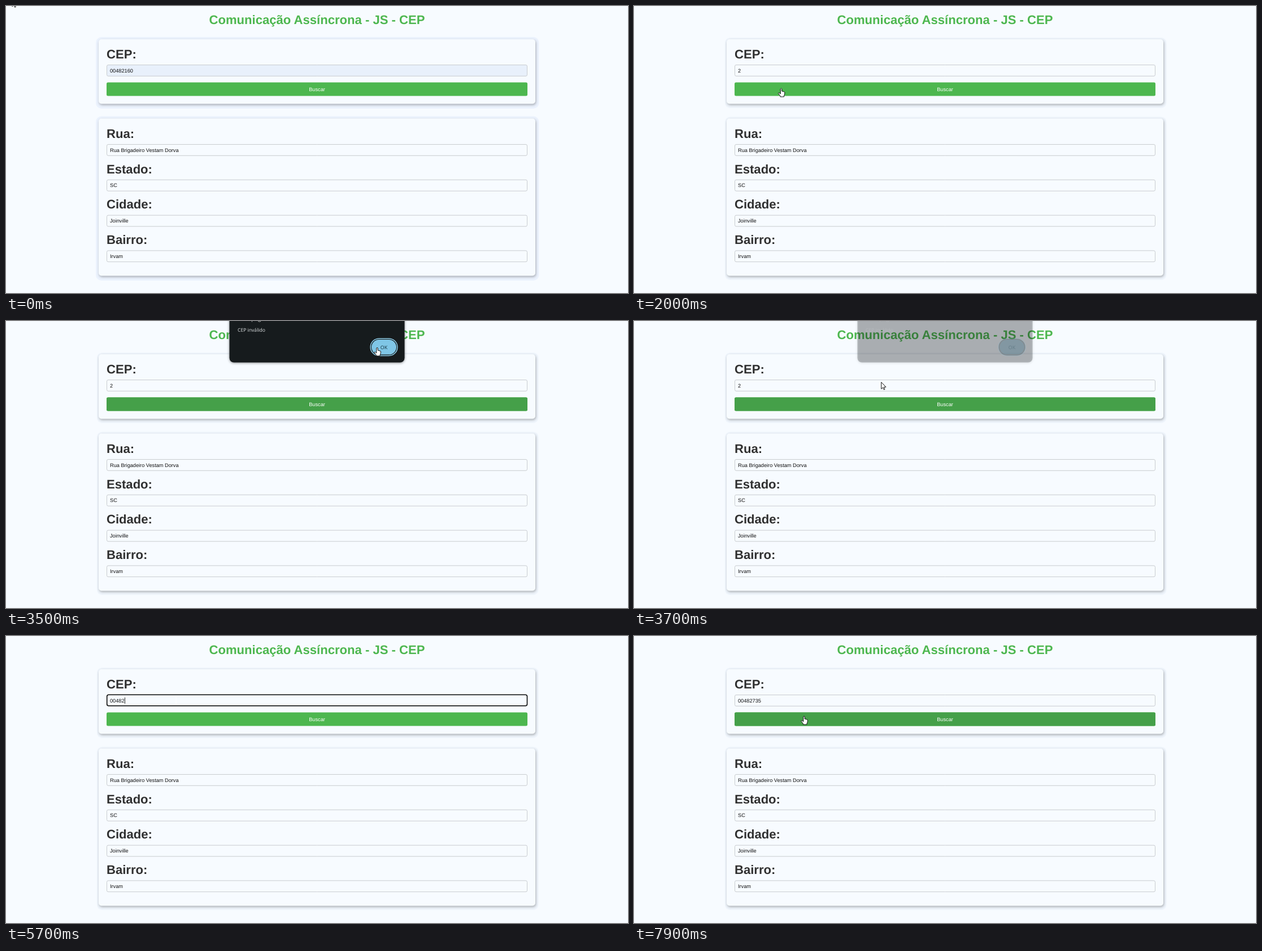
An HTML page with a canvas for the animation above (8000 ms loop, 1101 by 509 pixels).

```html
<!DOCTYPE html>
<html lang="pt-BR">
<head>
<meta charset="utf-8">
<title>CEP</title>
<style>
html, body { margin: 0; width: 100%; height: 100%; overflow: hidden; background: #f7fbff; }
canvas { display: block; }
</style>
</head>
<body>
<canvas id="stage" width="1101" height="509"></canvas>
<script>
const ctx = document.getElementById('stage').getContext('2d');
ctx.textRendering = 'geometricPrecision';

const LOOP = 8000, STEP = 50;
const PAGE = '#f7fbff', GREEN = '#4db74f', DARK_GREEN = '#45a049';
const ARIAL = '"Liberation Sans", Arial, sans-serif';
const UI = '"Open Sans", sans-serif';
const HEADING = `bold 22.08px ${ARIAL}`, SMALL = `9.2px ${ARIAL}`;
const OLD_CODE = '00482160', NEW_CODE = '00482735';
const ADDRESS = [
  ['Rua:', 'Rua Brigadeiro Vestam Dorva'],
  ['Estado:', 'SC'],
  ['Cidade:', 'Joinville'],
  ['Bairro:', 'Irvam'],
];

// Pointer stops: time, x, y
const STOPS = [
  [0, 11, -11], [500, 258.5, 109.5], [1700, 258.5, 109.5], [1950, 260.5, 146],
  [2300, 260.5, 146], [2500, 241, 122], [2650, 241, 122], [3500, 657, 47],
  [3600, 657, 47], [3750, 361, 130], [3850, 361, 130], [4150, 303, 127],
  [4200, 301, 114], [7350, 301, 114], [7600, 301, 142], [LOOP, 301, 142],
];
const ARROW = new Path2D('M0 0V12L2.8 9.4 4.6 13.4 6.3 12.6 4.6 8.7H8.3Z');
const HAND = new Path2D('M-1.2 1Q0-.8 1.2 1V5L5 6Q6.6 6.4 6.4 8L5.9 11.3 5 13V15H-1.6V13.4L-4.8 9.5Q-5.4 7.8-3.8 7.8L-1.2 9.8Z');

const clamp = v => Math.max(0, Math.min(1, v));
const within = (t, a, b) => t >= a && t < b;

function text(str, x, y, font, color, align = 'left') {
  ctx.font = font;
  ctx.fillStyle = color;
  ctx.textAlign = align;
  ctx.fillText(str, x, y);
}

function box(x, y, w, h, r, fill, stroke, line = 1) {
  ctx.beginPath();
  ctx.roundRect(x, y, w, h, r);
  if (fill) { ctx.fillStyle = fill; ctx.fill(); }
  if (stroke) { ctx.strokeStyle = stroke; ctx.lineWidth = line; ctx.stroke(); }
}

function shadow(color, blur, dx = 0, dy = 0) {
  ctx.shadowColor = color;
  ctx.shadowBlur = blur;
  ctx.shadowOffsetX = dx;
  ctx.shadowOffsetY = dy;
}

function card(y, h, strong) {
  if (strong) box(159, y - 4, 784.5, h + 12.5, 10, '#ebf2fd');
  else box(161, y - 3, 781.5, h + 10.5, 9, '#eff5fc');
  shadow('rgba(0,0,0,.3)', 4, 1, 2);
  box(164, y, 773, h, 5, PAGE);
  shadow('transparent', 0);
}

function field(label, value, y, fill) {
  text(label, 178, y - 11.2, HEADING, '#303030');
  box(178.5, y + .5, 744, 19.8, 2.5, fill, '#c9cccf');
  text(value, 184, y + 13.6, SMALL, '#111');
}

function codeAt(t) {
  if (t < 1600) return OLD_CODE;
  if (t < 5350) return '2';
  const typed = t < 6600 ? Math.min(5, 1 + Math.floor((t - 5350) / 87.5))
                         : Math.min(8, 6 + Math.floor((t - 6600) / 100));
  return NEW_CODE.slice(0, typed);
}

function codeField(t) {
  const value = codeAt(t);
  field('CEP:', value, 104, t < 1600 ? '#e8f0fb' : null);
  if (!within(t, 700, 2000) && !within(t, 4500, 7900)) return;
  box(178.7, 104.2, 743.8, 19.6, 3, null, '#0a0a0a', 1.6);
  ctx.font = SMALL;
  const width = ctx.measureText(value).width;
  if (within(t, 900, 1600) || within(t, 4650, 5350)) {
    box(184, 109, width, 11, 0, '#2668d0');
    text(value, 184, 117.6, SMALL, '#fff');
  } else if (!within(t, 6150, 6600) && t < 7400) {
    box(184.4 + width, 109, .9, 11, 0, '#111');
  }
}

function button(t) {
  const hover = t < 4000 ? +within(t, 2050, 3750) : clamp((t - 7400) / 150);
  box(178, 135.5, 745, 24, 2.5, GREEN);
  ctx.globalAlpha = hover;
  box(178, 135.5, 745, 24, 2.5, DARK_GREEN);
  ctx.globalAlpha = 1;
  text('Buscar', 550.5, 150.7, SMALL, '#fff', 'center');
}

function suggestions(t) {
  if (!within(t, 6600, 7100)) return;
  const rows = t < 6700 ? [NEW_CODE, '00482160', '00482918'] : [NEW_CODE];
  ctx.globalAlpha = 1 - clamp((t - 6900) / 200) ** 1.5;
  ctx.beginPath();
  ctx.moveTo(254.5, 131);
  ctx.lineTo(261, 125);
  ctx.lineTo(267.5, 131);
  ctx.fillStyle = '#202326';
  ctx.fill();
  box(247.5, 131, 105.5, 29 + 26 * (rows.length - 1), 4, '#111418', '#34383a');
  rows.forEach((row, i) => text(row, 255, 149.3 + 26 * i, `600 8.4px ${UI}`, '#d3dadb'));
  ctx.globalAlpha = 1;
}

function dialog(opacity) {
  if (!opacity) return;
  ctx.globalAlpha = opacity;
  shadow('rgba(0,0,0,.45)', 4, 0, 1);
  box(395.5, -20, 310, 93.5, 8, '#161b1d');
  shadow('transparent', 0);
  text('Essa página diz', 410, -.8, `10.3px ${UI}`, '#e6e8e8');
  text('CEP inválido', 410, 18.8, `8.6px ${UI}`, '#dfe3e4');
  box(645.2, 31.2, 47.6, 30.2, 15, '#101516', '#8fcfea', 1.5);
  box(647, 33, 44, 26.6, 13.3, '#7fc6e6');
  text('OK', 669, 49.6, `8.8px ${UI}`, '#12303c', 'center');
  ctx.globalAlpha = 1;
}

function pointer(t, modal) {
  const i = STOPS.findIndex(stop => stop[0] > t);
  const [t0, x0, y0] = STOPS[i - 1], [t1, x1, y1] = STOPS[i];
  const p = (t - t0) / (t1 - t0), k = p * p * (3 - 2 * p);
  const x = x0 + (x1 - x0) * k, y = y0 + (y1 - y0) * k;
  ctx.save();
  ctx.translate(x, y);
  if (!modal && within(x, 178, 923) && within(y, 104, 124.5)) {
    box(-.5, -5, 1, 10, 0, '#fff');
    box(-1.5, -5.7, 3, 1, 0, '#fff');
    box(-1.5, 4.7, 3, 1, 0, '#fff');
  } else {
    const onButton = !modal && within(x, 178, 923) && within(y, 135.5, 159.5);
    const onOk = modal && within(x, 647, 691) && within(y, 33, 60);
    const shape = onButton || onOk ? HAND : ARROW;
    ctx.fillStyle = '#fff';
    ctx.strokeStyle = '#111';
    ctx.lineWidth = 1;
    ctx.lineJoin = 'round';
    ctx.fill(shape);
    ctx.stroke(shape);
  }
  ctx.restore();
}

function draw(t) {
  ctx.fillStyle = PAGE;
  ctx.fillRect(0, 0, 1101, 509);
  text('Comunicação Assíncrona - JS - CEP', 550.5, 32.4, HEADING, GREEN, 'center');
  card(59, 114.5, t < 1600);
  card(199.5, 279, t < 1600);
  codeField(t);
  button(t);
  ADDRESS.forEach(([label, value], i) => field(label, value, 245 + 62.8 * i));
  suggestions(t);
  const opacity = clamp(Math.min(t - 2300, 3750 - t) / 200);
  dialog(opacity);
  pointer(t, opacity > 0);
}

function tick(now) {
  draw(Math.floor(now % LOOP / STEP) * STEP);
  requestAnimationFrame(tick);
}
requestAnimationFrame(tick);
</script>
</body>
</html>
```
